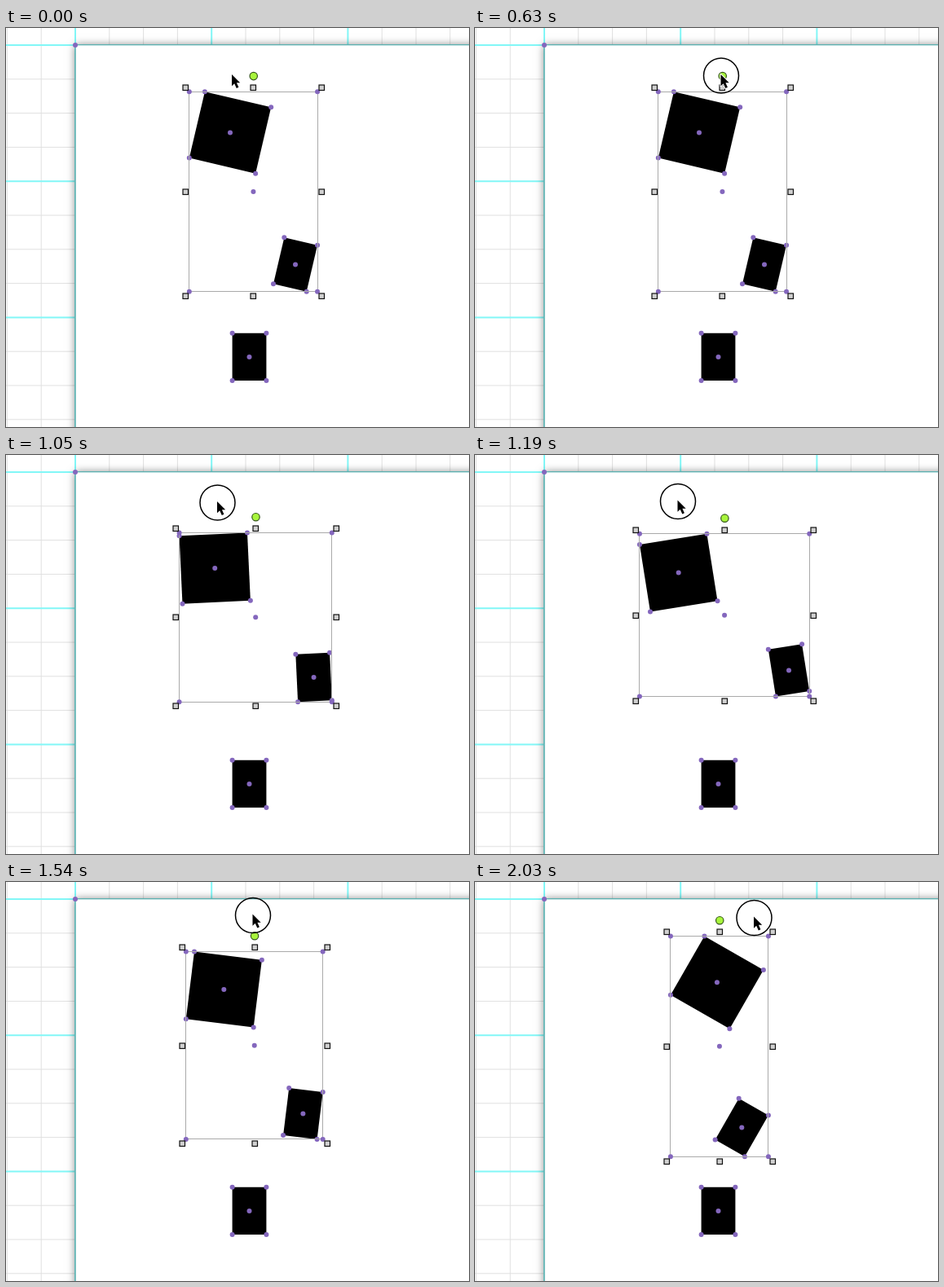
Write an HTML page with a canvas that moves like this. It is 568 px wide and 490 px high and loops after 2100 ms.

```html
<!DOCTYPE html>
<html lang="en">
<head>
<meta charset="utf-8">
<title>Rotating a selection</title>
<style>
html, body { margin: 0; width: 100%; height: 100%; overflow: hidden; background: #fff; }
canvas { display: block; }
</style>
</head>
<body>
<canvas id="stage" width="568" height="490"></canvas>
<script>
const W = 568, H = 490, LOOP = 2100, STEP = 70, PRESS = 490;
const GRID = 41.8, LEFT = 85, TOP = 21;
const PIVOT = [303.5, 201];
const PURPLE = '#8467bd';
const c = document.getElementById('stage').getContext('2d');

// Rectangles of the selection, relative to the pivot at zero rotation
const BIG = { x: -44.3, y: -64.1, w: 83.5, h: 83.5 };
const SMALL = { x: 70.6, y: 75.4, w: 41.8, h: 58.4 };
const LOOSE = { x: 298.5, y: 403.9, w: 41.8, h: 58.4 };

// [time, degrees]
const TURN = [[0, 13.2], [770, 13.2], [840, 12.5], [910, 6.5], [980, 1],
  [1050, -2.7], [1190, -9], [1330, -12.7], [1400, -11], [1470, -3.5],
  [1540, 7], [1610, 14], [1680, 19.3], [1750, 22.9], [1890, 27.6], [2030, 29.8]];

// [time, x, y]
const POINTER = [[0, 277.5, 58.5], [140, 293, 58.5], [280, 304, 58.5],
  [490, 304, 58.5], [700, 301, 58.5], [770, 291, 58.5], [840, 274, 58.5],
  [980, 262.5, 58.5], [1050, 259.5, 58.5], [1190, 249, 57], [1330, 247.5, 52],
  [1400, 253.5, 49.5], [1470, 278, 43], [1540, 303, 41], [1610, 320, 42.5],
  [1680, 331, 45], [1750, 336.5, 47.5], [2030, 342.5, 44]];

const ARROW = [[0, 0], [0, 14.2], [3.2, 11.2], [5.8, 17], [8.4, 15.8], [5.9, 10.2], [10.2, 10.2]];

function at(keys, t) {
  const i = keys.findIndex(k => k[0] >= t);
  if (i < 1) return keys[0].slice(1);
  const a = keys[i - 1], b = keys[i], f = (t - a[0]) / (b[0] - a[0]);
  return a.slice(1).map((v, j) => v + (b[j + 1] - v) * f);
}

function line(x1, y1, x2, y2, color, width) {
  c.strokeStyle = color;
  c.lineWidth = width;
  c.beginPath();
  c.moveTo(x1, y1);
  c.lineTo(x2, y2);
  c.stroke();
}

function disc(x, y, r, fill, stroke, width) {
  c.beginPath();
  c.arc(x, y, r, 0, 7);
  if (fill) { c.fillStyle = fill; c.fill(); }
  if (stroke) { c.strokeStyle = stroke; c.lineWidth = width; c.stroke(); }
}

const dot = ([x, y]) => disc(x, y, 3, PURPLE);

function polygon(points) {
  c.beginPath();
  points.forEach(p => c.lineTo(...p));
  c.closePath();
}

function box(x, y, w, h) {
  return [[x - w / 2, y - h / 2], [x + w / 2, y - h / 2], [x + w / 2, y + h / 2], [x - w / 2, y + h / 2]];
}

function rotate([x, y], a) {
  const cos = Math.cos(a), sin = Math.sin(a);
  return [PIVOT[0] + x * cos - y * sin, PIVOT[1] + x * sin + y * cos];
}

function shape(corners, center) {
  polygon(corners);
  c.fillStyle = '#000';
  c.fill();
  corners.forEach(dot);
  dot(center);
}

function background() {
  c.fillStyle = '#fff';
  c.fillRect(0, 0, W, H);
  for (const major of [false, true]) {
    const color = major ? '#82f7f7' : '#e0e0e0', width = major ? 2 : 1;
    for (let i = -2; i < 12; i++) {
      if ((i % 4 === 0) !== major) continue;
      const x = LEFT + i * GRID, y = TOP + i * GRID;
      line(x, 0, x, H, color, width);
      line(0, y, W, y, color, width);
    }
  }
  c.save();
  c.shadowColor = 'rgba(0,0,0,.5)';
  c.shadowBlur = 10;
  c.fillStyle = '#fff';
  c.fillRect(LEFT, TOP, W, H);
  c.restore();
  c.strokeStyle = '#55aaaa';
  c.lineWidth = 1;
  c.strokeRect(LEFT + .2, TOP - .2, W, H);
  dot([LEFT, TOP]);
}

function selection(a) {
  const all = [];
  for (const s of [BIG, SMALL]) {
    const corners = box(s.x, s.y, s.w, s.h).map(p => rotate(p, a));
    shape(corners, rotate([s.x, s.y], a));
    all.push(...corners);
  }
  const xs = all.map(p => p[0]), ys = all.map(p => p[1]);
  const l = Math.min(...xs), r = Math.max(...xs), t = Math.min(...ys), b = Math.max(...ys);
  const mx = (l + r) / 2, my = (t + b) / 2;
  const frame = box(mx, my, r - l, b - t);
  polygon(frame.map(p => p.map(v => Math.floor(v) + .5)));
  c.strokeStyle = '#aaa';
  c.lineWidth = 1;
  c.stroke();
  frame.forEach(dot);
  dot([mx, my]);
  for (const x of [l - 5, mx, r + 5]) for (const y of [t - 5.3, my, b + 5.3]) {
    if (x === mx && y === my) continue;
    const hx = Math.round(x), hy = Math.round(y);
    c.fillStyle = '#d0d0d0';
    c.fillRect(hx - 3, hy - 3, 7, 7);
    c.strokeStyle = '#111';
    c.lineWidth = 1.2;
    c.strokeRect(hx - 3, hy - 3, 6.5, 6.5);
  }
  disc(mx + .3, t - 19.2, 4.7, '#a8f53c', '#36571c', 1.2);
}

function pointer(x, y, pressed) {
  if (pressed) disc(x, y, 21.5, null, '#000', 1.5);
  c.save();
  c.translate(x - .5, y - 1.5);
  polygon(ARROW);
  c.lineJoin = 'round';
  c.strokeStyle = '#fff';
  c.lineWidth = 2;
  c.stroke();
  c.fillStyle = '#000';
  c.fill();
  c.restore();
}

function draw(now) {
  const t = Math.floor(now % LOOP / STEP) * STEP;
  background();
  shape(box(LOOSE.x, LOOSE.y, LOOSE.w, LOOSE.h), [LOOSE.x, LOOSE.y]);
  selection(at(TURN, t)[0] * Math.PI / 180);
  pointer(...at(POINTER, t), t >= PRESS);
  requestAnimationFrame(draw);
}

const start = performance.now();
draw(0);
function tick() { return performance.now() - start; }
</script>
</body>
</html>
```
